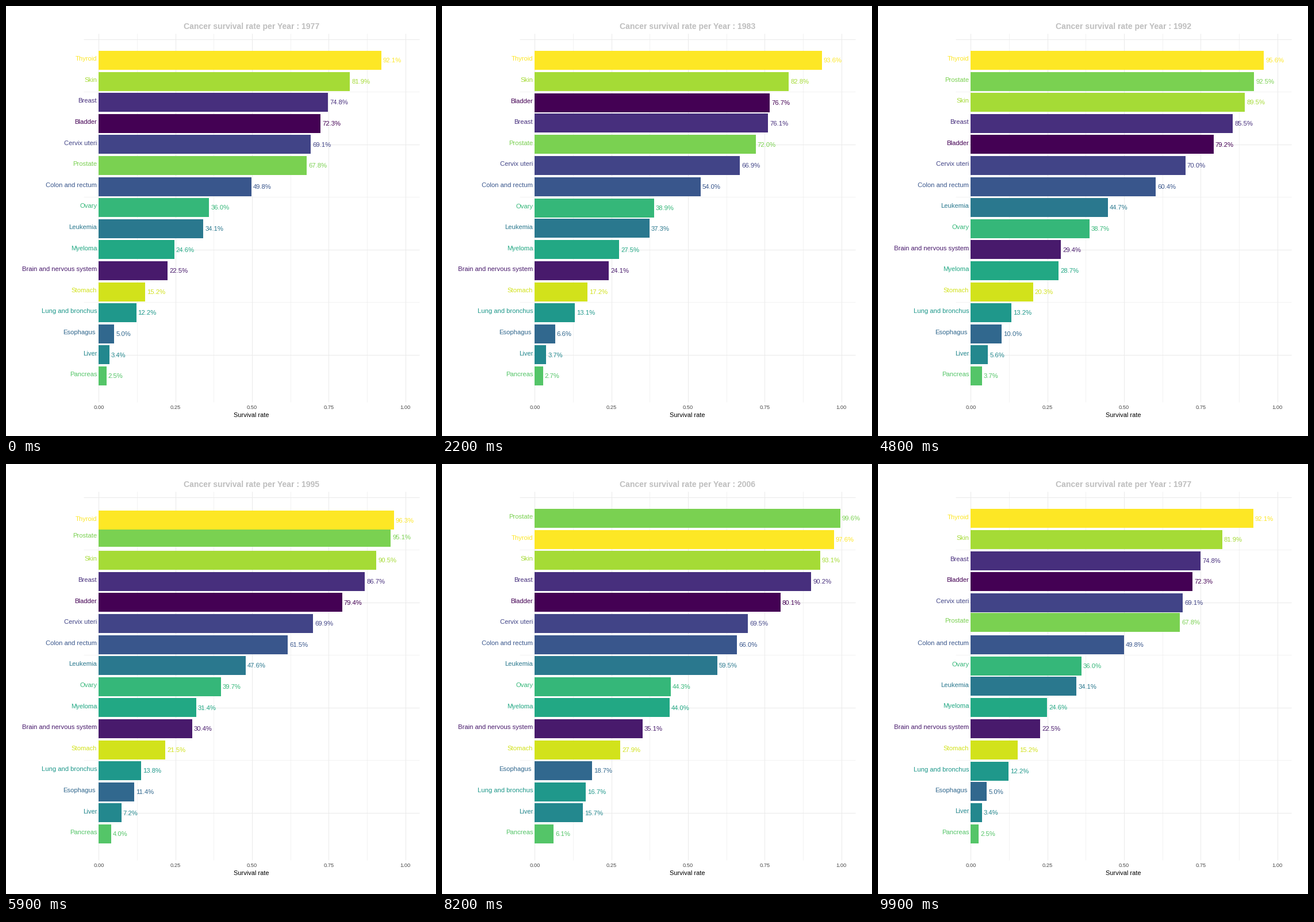
Animation, 748 px wide and 748 px high, one loop 10000 ms. Source, as a matplotlib script:

```python
import numpy as np
import matplotlib.pyplot as plt
from matplotlib.animation import FuncAnimation

plt.rcParams["font.family"] = "Liberation Sans"

SIZE, DPI = 748, 100
X0, X_SPAN = 161.45, 533.2     # pixels at rate 0, and for one unit of rate
Y0, ROW = 57.85, 36.6          # pixel of rank 0, and the step per rank
HOLD, MOVE = 3, 7              # frames at rest, frames in motion
PERIOD = HOLD + MOVE - 1
GRID = "#ebebeb"

YEARS = [*range(1977, 2002, 3), 2006, 2013]
LAST_KEY = YEARS.index(2006)

# Percent survival in 1977, 1983, 1989 and 2006.
KEYS = {
    "Bladder": (72.3, 76.7, 79.0, 80.1),
    "Brain and nervous system": (22.5, 24.1, 28.9, 35.1),
    "Breast": (74.8, 76.1, 84.0, 90.2),
    "Cervix uteri": (69.1, 66.9, 70.1, 69.5),
    "Colon and rectum": (49.8, 54.0, 59.6, 66.0),
    "Esophagus": (5.0, 6.6, 9.4, 18.7),
    "Leukemia": (34.1, 37.3, 42.9, 59.5),
    "Liver": (3.4, 3.7, 4.9, 15.7),
    "Lung and bronchus": (12.2, 13.1, 13.0, 16.7),
    "Myeloma": (24.6, 27.5, 27.2, 44.0),
    "Ovary": (36.0, 38.9, 38.2, 44.3),
    "Pancreas": (2.5, 2.7, 3.5, 6.1),
    "Prostate": (67.8, 72.0, 82.8, 99.6),
    "Skin": (81.9, 82.8, 88.1, 93.1),
    "Stomach": (15.2, 17.2, 19.7, 27.9),
    "Thyroid": (92.1, 93.6, 94.4, 97.6),
}
NAMES = list(KEYS)


def trend(a, b, c, d):
    """Straight up to 1989, then a curve that flattens early for high rates."""
    state = np.arange(len(YEARS))
    u = np.maximum(state - 4, 0) / (LAST_KEY - 4)
    late = c + (d - c) * u ** (1.8 * (1 - d / 100) ** 0.3)
    early = np.interp(state, [0, 2, 4], [a, b, c])
    return np.minimum(np.where(state < 4, early, late), 99.6)


values = np.array([trend(*k) for k in KEYS.values()]).T
ranks = 1 + np.argsort(np.argsort(-values, axis=1), axis=1)


def px(rate):
    return X0 + X_SPAN * rate


def ease(t):
    return 4 * t**3 if t < 0.5 else 1 - 4 * (1 - t)**3


fig = plt.figure(figsize=(SIZE / DPI, SIZE / DPI), dpi=DPI, facecolor="white")
ax = fig.add_axes([0, 0, 1, 1])


def write(x, y, s, size, color, ha="center", **kw):
    return ax.text(x, y, s, fontsize=size * 72 / DPI, color=color, ha=ha,
                   va="baseline", zorder=3, **kw)


def rule(xs, ys, major):
    ax.plot(xs, ys, color=GRID, lw=(1.07 if major else 0.6) * 72 / DPI,
            solid_capstyle="butt", zorder=0)


for i in range(9):
    rule([px(i / 8)] * 2, [48, 688.5], i % 2 == 0)
for i in range(7):
    rule([134.6, 718.6], [Y0 + 2.5 * i * ROW] * 2, i % 2 == 0)
for i in range(5):
    write(px(i / 4), 701.3, f"{i / 4:.2f}", 9.4, "#4d4d4d")
write(427, 715.3, "Survival rate", 11, "black")
title = write(427, 39.8, "", 14, "#bebebe", weight="bold")

colors = plt.cm.viridis(np.linspace(0, 1, len(NAMES)))
bars = ax.barh(np.zeros(len(NAMES)), np.ones(len(NAMES)), left=X0,
               height=0.9 * ROW, color=colors, linewidth=0, zorder=2)
tags = [write(155.2 if n == "Esophagus" else 158.2, 0, n, 11.2, c, "right")
        for n, c in zip(NAMES, colors)]
notes = [write(0, 0, "", 11.2, c, "left") for c in colors]

ax.set(xlim=(0, SIZE), ylim=(SIZE, 0))
ax.axis("off")


def update(frame):
    state, step = divmod(max(frame - 1, 0), PERIOD)
    step = max(step - HOLD + 1, 0)
    nxt = (state + 1) % len(YEARS)
    k = ease(step / MOVE)

    title.set_text("Cancer survival rate per Year : "
                   f"{YEARS[nxt if step > 4 else state]}")
    rate = values[state] + k * (values[nxt] - values[state])
    rank = ranks[state] + k * (ranks[nxt] - ranks[state])
    shown = values[nxt if k >= 0.5 else state]

    for i, bar in enumerate(bars):
        y, end = Y0 + ROW * rank[i], px(rate[i] / 100)
        bar.set_y(y - 0.45 * ROW)
        bar.set_width(end - X0)
        tags[i].set_y(y + 0.8)
        notes[i].set_position((end + 3, y + 3.8))
        notes[i].set_text(f"{shown[i]:.1f}%")
    return [title, *bars, *tags, *notes]


anim = FuncAnimation(fig, update, frames=100, interval=100, repeat=True,
                     repeat_delay=0, blit=False)
plt.show()
```
